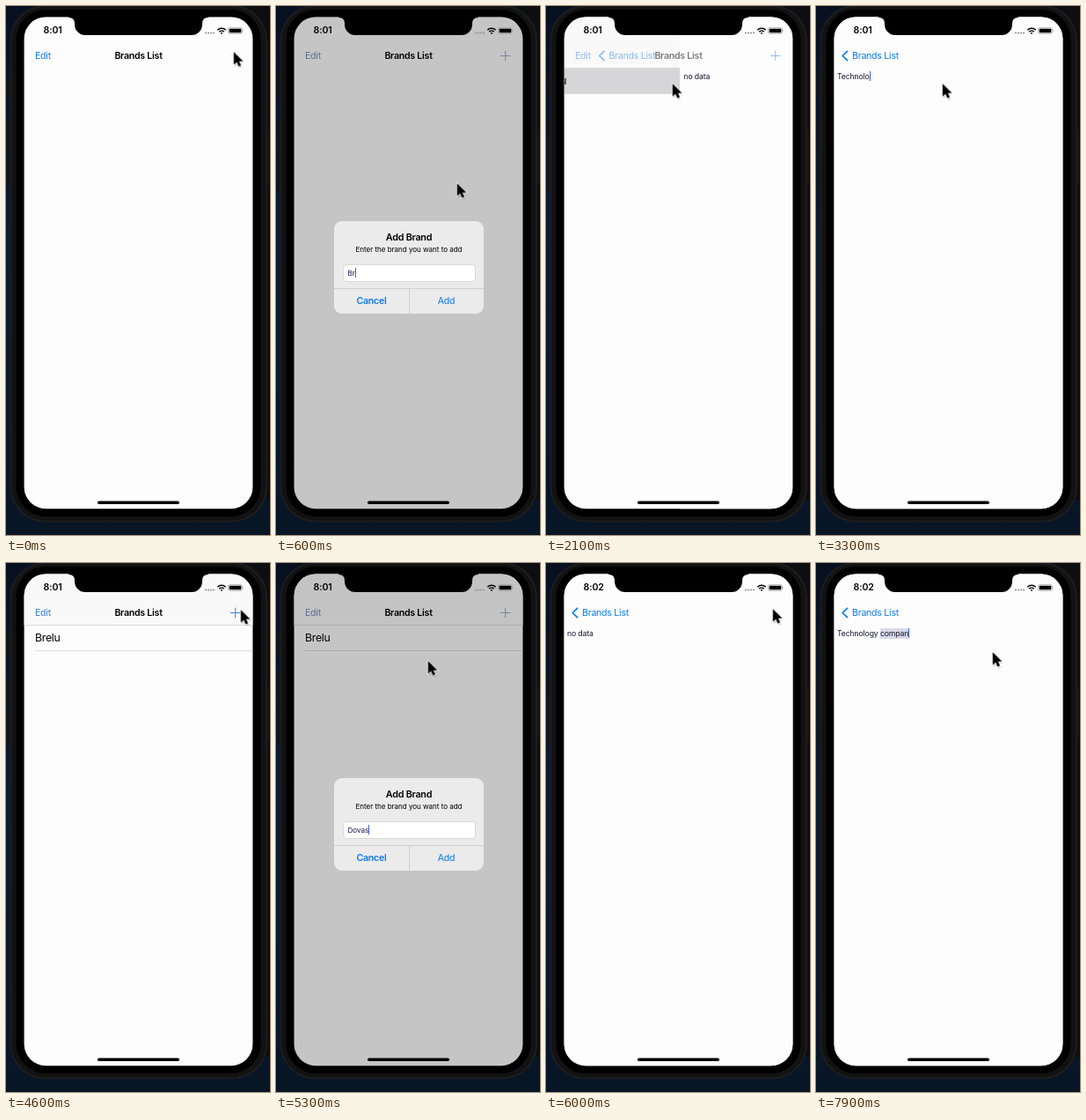
An HTML page that plays this animation: 300 by 600 pixels, repeating every 8000 ms.

```html
<!DOCTYPE html>
<html lang="en">
<head>
<meta charset="utf-8">
<title>Brands List</title>
<style>
  html, body { margin: 0; width: 100%; height: 100%; overflow: hidden; background: #08101d; }
  #stage {
    position: relative; width: 300px; height: 600px; overflow: hidden;
    font: 10.6px/20px Inter, "Noto Sans", sans-serif; letter-spacing: -.26px; color: #000;
    --blue: #0a7af0;
  }
  #stage * { box-sizing: border-box; }
  svg, .layer { position: absolute; left: 0; top: 0; width: 300px; height: 600px; }
  .t { position: absolute; white-space: pre; margin: 0; }
  .mid { left: 0; width: 301px; text-align: center; }
  .bold { font-weight: 600; }
  .blue { color: var(--blue); }
  .anim, #mouse { animation: 8s ease-out infinite; }

  #screen { clip-path: inset(12.5px 19.6px 29.8px 20.6px round 24.5px); background: #fdfdfd; }
  #list { animation-name: under; }
  #detail { animation-name: push; background: #fdfdfd; clip-path: inset(0 19px 0 20px); }
  .nav-list { animation-name: navList; }
  .nav-detail { animation-name: navDetail; }
  .nav-list .t, .nav-detail .t { top: 46.5px; }
  .tint { animation-name: tint; }
  .plus { animation-name: press; }

  .bar { position: absolute; left: 20px; top: 12px; width: 261px; height: 59px; background: #f9f9f9; border-bottom: 1px solid #dcdcdc; }
  .row {
    position: absolute; left: 21px; width: 260px; height: 29px; padding-left: 12px;
    font-size: 12.3px; line-height: 28px;
  }
  .row::after { content: ""; position: absolute; left: 12px; right: 0; bottom: 0; height: 1px; background: #dcdcdc; }
  .first { animation-name: first; }
  .second { animation-name: second; }
  .tap1 { animation: tap1 8s step-end infinite; }
  .tap2 { animation: tap2 8s step-end infinite; }

  .note { left: 24px; top: 70px; font-size: 8.7px; letter-spacing: -.14px; color: #14142a; }
  #tail { background: #d9d9e8; color: inherit; padding: 1px 0; }
  .caret { display: inline-block; width: 1px; height: 11px; vertical-align: -2px; background: #3b5fd0; }

  #dim { background: #000; animation-name: dim; }
  #alert {
    position: absolute; left: 65.5px; top: 243.7px; width: 170px; height: 104.6px;
    border-radius: 9px; background: #ebebeb; animation-name: alert;
  }
  #alert .mid { width: 170px; }
  .field {
    left: 9.5px; top: 49.3px; width: 151px; height: 20px; padding-left: 5px;
    font-size: 8.1px; letter-spacing: -.05px; color: #14144a;
    background: #fff; border: 1px solid #dadada; border-radius: 4px;
  }
  .rule { position: absolute; background: #d0d0d2; }
  #mouse { animation-name: mouse; animation-timing-function: ease-in-out; }

  @keyframes push {
    0%, 25% { transform: translateX(261px); }
    28.75%, 51.25% { transform: none; }
    55%, 72.25% { transform: translateX(261px); }
    74.5%, 100% { transform: none; }
  }
  @keyframes under {
    0%, 25% { transform: none; }
    28.75%, 51.25% { transform: translateX(-78px); }
    55%, 72.25% { transform: none; }
    74.5%, 100% { transform: translateX(-78px); }
  }
  @keyframes navList {
    0%, 25% { opacity: 1; }
    28.75%, 51.25% { opacity: 0; }
    55%, 72.25% { opacity: 1; }
    74.5%, 100% { opacity: 0; }
  }
  @keyframes navDetail {
    0%, 25% { opacity: 0; transform: translateX(60px); }
    28.75%, 51.25% { opacity: 1; transform: none; }
    55%, 72.25% { opacity: 0; transform: translateX(60px); }
    74.5%, 100% { opacity: 1; transform: none; }
  }
  @keyframes dim {
    0%, 1.25% { opacity: 0; }
    3.75%, 13.75% { opacity: .22; }
    16%, 60% { opacity: 0; }
    62.25%, 68.75% { opacity: .22; }
    70.6%, 100% { opacity: 0; }
  }
  @keyframes alert {
    0%, 1.25% { opacity: 0; transform: scale(1.15); }
    3.75%, 13.75% { opacity: 1; transform: none; }
    16% { opacity: 0; transform: none; }
    16.1%, 60% { opacity: 0; transform: scale(1.15); }
    62.25%, 68.75% { opacity: 1; transform: none; }
    70.6%, 100% { opacity: 0; transform: none; }
  }
  @keyframes tint {
    0%, 1.25% { color: #0a7af0; }
    3.75%, 13.75% { color: #6f8fb8; }
    16%, 60% { color: #3580d8; }
    62.25%, 68.75% { color: #6f8fb8; }
    71%, 100% { color: #3580d8; }
  }
  @keyframes press {
    0%, 1.25% { opacity: .18; }
    3.75%, 13.75% { opacity: .75; }
    16%, 58.75% { opacity: 1; }
    59.5% { opacity: .18; }
    62.25%, 68.75% { opacity: .75; }
    71%, 100% { opacity: 1; }
  }
  @keyframes first { 0%, 17.5% { opacity: 0; } 20%, 100% { opacity: 1; } }
  @keyframes second { 0%, 69.5% { opacity: 0; } 71%, 100% { opacity: 1; } }
  @keyframes tap1 { 0% { background: none; } 24.5% { background: #d6d6d8; } 29% { background: none; } }
  @keyframes tap2 { 0% { background: none; } 72% { background: #d6d6d8; } 75% { background: none; } }
  @keyframes mouse {
    0%, 2.5% { transform: translate(258px, 51px); }
    5%, 11.25% { transform: translate(205px, 200px); }
    13.75%, 17.5% { transform: translate(172px, 343px); }
    23.75%, 45% { transform: translate(143px, 87px); }
    48.75%, 51.25% { transform: translate(66px, 57px); }
    56.25%, 60% { transform: translate(266px, 52px); }
    63.75%, 67.5% { transform: translate(172px, 110px); }
    68.75%, 69.5% { transform: translate(178px, 338px); }
    71.75%, 72.5% { transform: translate(220px, 113px); }
    74.75%, 76.25% { transform: translate(257px, 51px); }
    81.25%, 83% { transform: translate(200px, 82px); }
    86.25%, 100% { transform: translate(200px, 100px); }
  }
</style>
</head>
<body>
<div id="stage">
  <svg viewBox="0 0 300 600">
    <defs>
      <linearGradient id="sky" x2="0" y2="1">
        <stop offset="0" stop-color="#07101f"/>
        <stop offset=".45" stop-color="#0c1c34"/>
        <stop offset="1" stop-color="#081525"/>
      </linearGradient>
    </defs>
    <path fill="url(#sky)" d="M0 0h300v600H0z"/>
    <path fill="#0d0e12" d="M270 0h30v560h-30z"/>
    <path fill="#151517" d="M1 80h6v24H1zM1 128h6v38H1zM1 168h6v40H1zM294 140h5v62h-5z"/>
    <rect x="4.5" y="-1" width="292.5" height="586.5" rx="40" fill="#1d1d1f"/>
    <rect x="6.5" y="1" width="288.5" height="582.5" rx="38" fill="#121213"/>
    <rect x="11.5" y="4" width="278" height="575" rx="34" fill="#000"/>
  </svg>

  <div id="screen" class="layer">
    <div id="list" class="layer anim">
      <div class="bar anim first"></div>
      <div class="anim first"><div class="row tap1" style="top:71px">Brelu</div></div>
      <div class="anim second"><div class="row tap2" style="top:100px">Dovask</div></div>
    </div>
    <div id="detail" class="layer anim">
      <p class="t note"><span id="head"></span><mark id="tail"></mark><i id="caret" class="caret"></i></p>
    </div>
    <div class="layer anim nav-list">
      <span class="t blue anim tint" style="left:33px">Edit</span>
      <span class="t mid bold">Brands List</span>
      <div class="layer anim tint blue">
        <svg class="anim plus" viewBox="0 0 300 600"><path stroke="currentColor" d="M255 56.5h11.5M260.7 50.7v11.5"/></svg>
      </div>
    </div>
    <div class="layer anim nav-detail blue">
      <svg viewBox="0 0 300 600"><path fill="none" stroke="currentColor" stroke-width="1.7" stroke-linecap="round" stroke-linejoin="round" d="M35.5 51.3l-5.3 5.2 5.3 5.2"/></svg>
      <span class="t" style="left:41px">Brands List</span>
    </div>

    <div id="dim" class="layer anim"></div>
    <div id="alert" class="anim">
      <span class="t mid bold" style="top:8.8px;font-size:10.8px">Add Brand</span>
      <span class="t mid" style="top:21.8px;font-size:8.1px;letter-spacing:-.05px">Enter the brand you want to add</span>
      <div class="t field" style="line-height:18.6px"><span id="brand"></span><i class="caret"></i></div>
      <i class="rule" style="left:0;top:76.3px;width:170px;height:1px"></i>
      <i class="rule" style="left:84.5px;top:76.3px;width:1px;height:28.3px"></i>
      <span class="t blue bold" style="left:0;width:85px;top:80.8px;text-align:center">Cancel</span>
      <span class="t blue" style="left:85px;width:85px;top:80.8px;text-align:center">Add</span>
    </div>
  </div>

  <svg viewBox="0 0 300 600">
    <path d="M71 12h159v1q-7 0-7 7v1a12 12 0 0 1-12 12H90a12 12 0 0 1-12-12v-1q0-7-7-7z"/>
    <g fill="#97979b">
      <circle cx="227" cy="30.5" r="1.1"/><circle cx="230" cy="30.5" r="1.1"/>
      <circle cx="233" cy="30.5" r="1.1"/><circle cx="236" cy="30.5" r="1.1"/>
    </g>
    <g fill="none" stroke="#000" stroke-width="1.4">
      <path d="M240.3 27.2a6.7 6.7 0 0 1 9.4 0M242.2 29.3a4 4 0 0 1 5.6 0"/>
      <rect x="252.4" y="24.7" width="16" height="6.6" rx="1.5" stroke="#999" stroke-width=".7"/>
    </g>
    <path d="M243.7 30.7a1.9 1.9 0 0 1 2.6 0l-1.3 1.4z"/>
    <rect x="253.7" y="25.7" width="13.6" height="4.6" rx=".8"/>
    <path fill="#999" d="M269.2 26.8q1.2 1.2 0 2.4z"/>
    <rect x="104" y="561.5" width="93" height="3.5" rx="1.75"/>
  </svg>
  <span id="clock" class="t bold" style="left:42.5px;top:18.4px;letter-spacing:-.1px"></span>

  <svg viewBox="0 0 300 600">
    <g id="mouse">
      <g transform="translate(.8 1) scale(1.05)">
        <path d="M1 2v14l3.2-3 2 4.8 2.6-1.1-2-4.6h4.3z" opacity=".18"/>
        <path d="M0 0v14l3.2-3 2 4.8 2.6-1.1-2-4.6h4.3z" stroke="#fff" stroke-width="1.2" paint-order="stroke"/>
      </g>
    </g>
  </svg>
</div>

<script>
  const LOOP = 8000, STEP = 100;
  const brands = ["Brelu", "Dovask"];
  const company = "Technology company", split = 11;
  const el = id => document.getElementById(id);
  const put = (id, text) => { if (el(id).textContent !== text) el(id).textContent = text; };
  const typed = (text, t, start, pace) => text.slice(0, Math.max(0, Math.floor((t - start) / pace)));

  // Each visit to the detail page: tap the field, clear it, type.
  const visits = [
    { tap: 2500, clear: 2800, type: 2900, pace: 50 },
    { tap: 6500, clear: 6800, type: 7100, pace: 47 }
  ];

  function draw(now) {
    const t = Math.floor(now % LOOP / STEP) * STEP;
    const v = visits[t < 4600 ? 0 : 1];
    const note = t < v.clear ? "no data" : typed(company, t, v.type, v.pace);

    put("clock", t < 5600 ? "8:01" : "8:02");
    put("brand", t < 4000 ? typed(brands[0], t, 400, 80) : typed(brands[1], t, 5050, 50));
    put("head", note.slice(0, split));
    put("tail", note.slice(split));
    el("caret").style.visibility = t < v.tap ? "hidden" : "visible";
    requestAnimationFrame(draw);
  }
  draw(performance.now());
</script>
</body>
</html>
```
